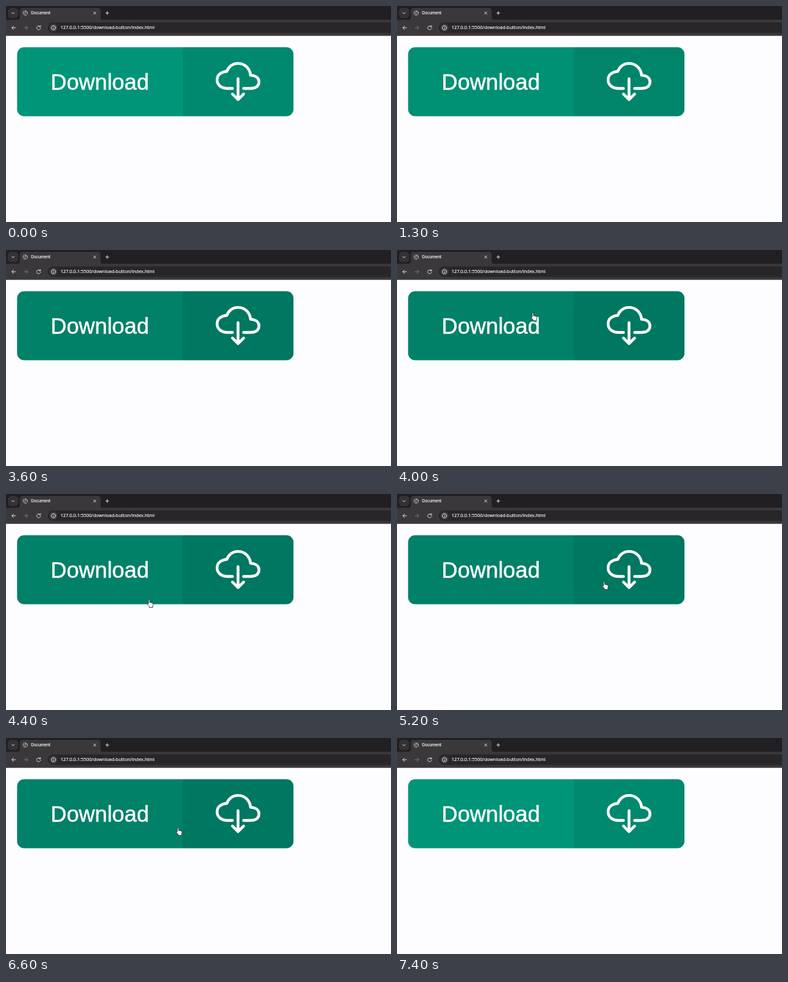
Animation, 600 px wide and 338 px high, one loop 7700 ms. Source, as an HTML page:

```html
<!DOCTYPE html>
<html lang="en">
<head>
<meta charset="utf-8">
<title>Document</title>
<style>
  html, body { margin: 0; width: 100%; height: 100%; overflow: hidden; background: #fdfcff; }
  svg { display: block; width: 600px; height: 338px; }
  .ui { font-family: "Open Sans", "Noto Sans", sans-serif; fill: #f1f0f2; stroke: #f1f0f2; stroke-width: .22; }
  .line { fill: none; stroke: #d9d8da; stroke-width: 1; stroke-linecap: round; stroke-linejoin: round; }
  .thin { stroke: #bebdc0; stroke-width: .8; }
  .dim { stroke: #79777a; }
  .label { font: 34.5px "Liberation Sans", Arial, sans-serif; fill: #fff; stroke: #fff; stroke-width: .5; text-anchor: middle; }
  .cloud { fill: none; stroke: #fff; stroke-width: 32; stroke-linecap: round; stroke-linejoin: round; }
  .cursor path { fill: #fff; stroke: #25252b; stroke-width: .8; stroke-linejoin: round; }
</style>
</head>
<body>
<svg viewBox="0 0 600 338">
  <defs>
    <clipPath id="round"><rect x="17.3" y="64.6" width="430.7" height="107.8" rx="11"/></clipPath>
  </defs>

  <!-- tab strip -->
  <rect width="600" height="22" fill="#211f22"/>
  <rect x="3" y="3" width="16" height="16" rx="5" fill="#343235"/>
  <path class="line" d="M9 10.2l2 2 2-2"/>
  <path d="M17 22q4.5 0 4.5-4.5V8q0-5 5-5h116q5 0 5 5v9.5q0 4.5 4.5 4.5z" fill="#3a383b"/>
  <circle class="line thin" cx="30" cy="11" r="3.5"/>
  <path class="line thin" d="M27 9.8l2.6 1 .2 2.8M30.5 7.8l-.2 1.8 2.8 .6"/>
  <text class="ui" x="39" y="13.4" font-size="6.2">Document</text>
  <path class="line" d="M136.5 9.2l3.6 3.6m0-3.6l-3.6 3.6M155.3 11h5m-2.5-2.5v5"/>

  <!-- toolbar -->
  <rect y="21.5" width="600" height="25.2" fill="#3a383b"/>
  <rect x="65" y="25.7" width="560" height="16.6" rx="8.3" fill="#282629"/>
  <circle cx="74" cy="34" r="6.5" fill="#3a383b"/>
  <path class="line" d="M15 34H9m2.8-2.8L9 34l2.8 2.8"/>
  <path class="line dim" d="M28 34h6m-2.8-2.8L34 34l-2.8 2.8"/>
  <path class="line" d="M53.4 32.2a3.1 3.1 0 1 0 .6 2.3M53.8 30.6v2h-2"/>
  <circle class="line" cx="74" cy="34" r="3.4"/>
  <path class="line" d="M74 33.9v1.7M74 32.2v.1"/>
  <text class="ui" x="85" y="36.4" font-size="7.13">127.0.0.1<tspan fill="#e2e1e4">:5500/download-button/index.html</tspan></text>

  <!-- button -->
  <g clip-path="url(#round)">
    <rect id="face" x="17" y="64" width="432" height="110"/>
    <rect x="275.5" y="64" width="174" height="110" opacity=".08"/>
  </g>
  <text class="label" x="146.2" y="130.5">Download</text>
  <path class="cloud" transform="translate(326.8 83.3) scale(.136)"
    d="M320 336h76c55 0 100-21.2 100-75.6s-53-73.5-96-75.6C391 99.7 329 48 256 48c-69 0-113.4 45.8-128 91.2-60 5.7-112 35.9-112 98.4S70 336 136 336h56M192 400l64 64 64-64M256 224v224"/>

  <g id="cursor" class="cursor">
    <path id="arrow" d="M0 0V9.4L2.1 7.4 3.5 10.5 4.9 9.9 3.6 6.9H6.5Z"/>
    <path id="hand" d="M-1 1a1 1 0 0 1 2 0V4.6l3.8 .8q1.6 .4 1.5 2L5.8 10V12.5H.4V11L-2.6 7.6q-.5-1 .4-1.3L-1 7Z"/>
  </g>
</svg>
<script>
const LOOP = 7700, STEP = 100;
const REST = [0, 149, 120], HOVER = [0, 129, 104];

// Spans in which the button is lit while no pointer is visible
const lit = [[300, 1200], [1900, 3000], [3300, 3800]];

// Turning points of the pointer: [time, x, y]
const turns = [
  [3800, 208, 76], [4400, 223, 165], [4600, 228, 228], [5100, 320, 130],
  [5600, 350, 203], [5950, 340, 304], [6600, 268, 140], [7200, 374, 36]
];

const [cursor, arrow, hand, face] =
  ["cursor", "arrow", "hand", "face"].map(id => document.getElementById(id));
const mix = (a, b, k) => a + (b - a) * k;
const ease = k => (1 - Math.cos(Math.PI * k)) / 2;
const show = (node, on) => { node.style.display = on ? "" : "none"; };

function pointer(t) {
  const i = turns.findIndex(p => p[0] > t);
  if (i < 1) return null;
  const [t0, x0, y0] = turns[i - 1], [t1, x1, y1] = turns[i];
  const k = ease((t - t0) / (t1 - t0));
  return { x: mix(x0, x1, k), y: mix(y0, y1, k) };
}

function hovered(t) {
  const p = pointer(t);
  if (p) return p.x > 17 && p.x < 448 && p.y > 65 && p.y < 172;
  return lit.some(([from, to]) => t >= from && t < to);
}

// Averaging the recent hover state gives a short fade
function glow(t) {
  const recent = [0, 50, 100, 150].filter(d => hovered(t - d));
  return recent.length / 4;
}

function draw() {
  const t = Math.floor(performance.now() % LOOP / STEP) * STEP;
  const level = glow(t), p = pointer(t), over = hovered(t);
  face.setAttribute("fill", `rgb(${REST.map((c, i) => Math.round(mix(c, HOVER[i], level)))})`);
  show(cursor, p);
  show(hand, over);
  show(arrow, !over);
  if (p) cursor.setAttribute("transform", `translate(${p.x} ${p.y})`);
  requestAnimationFrame(draw);
}
draw();
</script>
</body>
</html>
```
